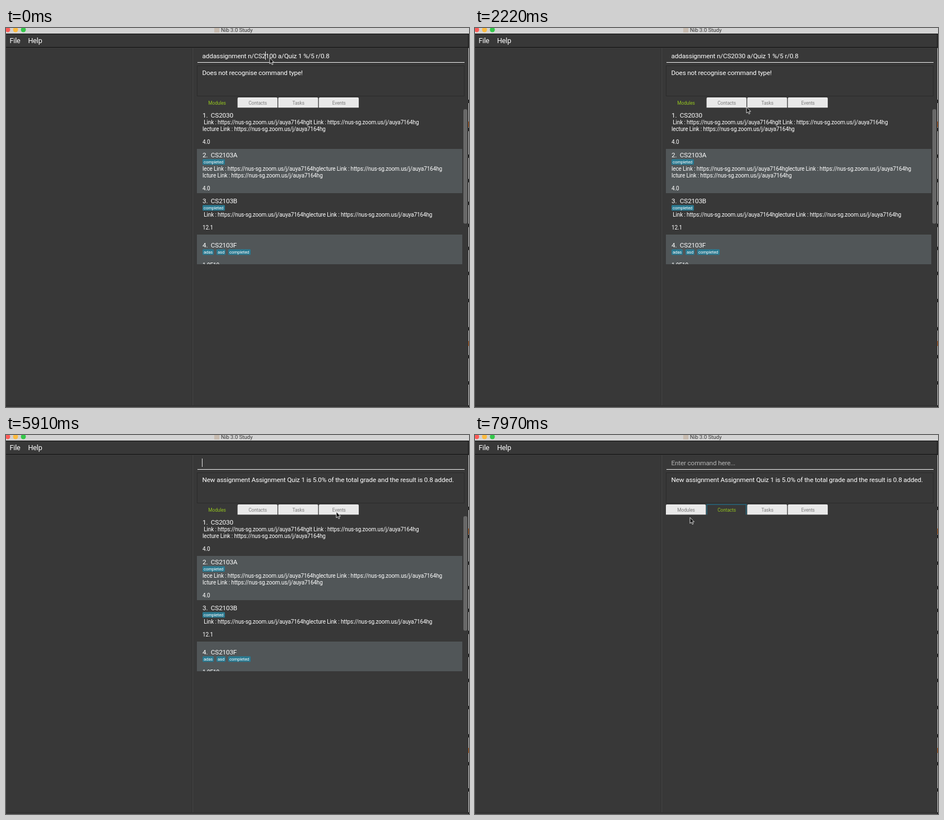
Recreate the animation shown at these times as an HTML page. Size 827 by 677 pixels, loop 8 s.

```html
<!DOCTYPE html>
<html lang="en">
<head>
<meta charset="utf-8">
<title>Course manager</title>
<style>
html, body { margin: 0; width: 100%; height: 100%; overflow: hidden; background: #383838; }
svg { display: block; }
text { font-family: Roboto, Inter, "Liberation Sans", sans-serif; letter-spacing: -.0145em; white-space: pre; fill: #fff; }
</style>
</head>
<body>
<svg id="stage" width="827" height="677" viewBox="0 0 827 677"></svg>
<script>
const rect = (x, y, w, h, fill, more = '') =>
  `<rect x="${x}" y="${y}" width="${w}" height="${h}" fill="${fill}" ${more}/>`;
const text = (x, y, size, str, more = '') =>
  `<text x="${x}" y="${y}" font-size="${size}" ${more}>${str}</text>`;
const repeat = (n, make) => Array.from({ length: n }, (_, i) => make(i)).join('');
const clamp = (v, lo, hi) => Math.min(hi, Math.max(lo, v));

const trafficLights = ['#fc5b57', '#fdbc40', '#34c84a'];
const frame = rect(0, 0, 827, 10, '#d3d3d3') +
  repeat(3, i => `<circle cx="${3 + i * 14}" cy="3" r="4.5" fill="${trafficLights[i]}"/>`) +
  rect(372, -1, 9, 9, '#c8bcb0') +
  text(384, 6.6, 9.9, 'Nib 3.0 Study', 'style="fill:#3c3c3c"') +
  rect(-.5, 10.5, 826.5, 24, '#383838', 'stroke="#101010"') +
  text(6.5, 27, 12.6, 'File') + text(39.5, 27, 12.6, 'Help') +
  rect(332, 36, 1, 638, '#2e2e2e') + rect(333, 36, 1, 638, '#484848') +
  rect(0, 674, 826, 1, '#2e2e2e') +
  rect(342, 61, 477, 1, '#f4f4f4') +
  rect(341.5, 67.5, 477, 54, 'none', 'stroke="#2b2b2b"');

// The strip of desktop beside the window
const desktop = rect(826, 36, 1, 641, '#c8c8c8') +
  repeat(13, i => rect(826, 128 + i * 45 + 8 * Math.sin(i * 7), 1, 6, '#0a0a0a')) +
  rect(826, 167, 1, 10, '#c8641e') + rect(826, 559, 1, 9, '#c8641e');

const link = 'Link : https://nus-sg.zoom.us/j/auya7164hg';
const cards = [
  { y: 160, name: 'CS2030', tags: [], lines: [` ${link}lt ${link}`, `lecture ${link}`], credits: '4.0' },
  { y: 231, name: 'CS2103A', tags: ['completed'], lines: [`lece ${link}lecture ${link}`, `lcture ${link}`], credits: '4.0' },
  { y: 313, name: 'CS2103B', tags: ['completed'], lines: [` ${link}lecture ${link}`], credits: '12.1' },
  { y: 392, name: 'CS2103F', tags: ['adas', 'asd', 'completed'], lines: [], credits: '1.0E10' }
];

function tagRow(tags, y) {
  let x = 351;
  return tags.map(str => {
    const w = 4 * str.length + 4;
    const svg = rect(x, y, w, 10, '#2a7990', 'rx="1.5"') + text(x + 2, y + 7.6, 7.7, str);
    x += w + 5;
    return svg;
  }).join('');
}

function card({ y, name, tags, lines, credits }, i) {
  const first = y + (tags.length ? 24 : 12);
  return text(351, y, 11.75, `${i + 1}.  ${name}`) + tagRow(tags, y + 3.3) +
    lines.map((str, k) => text(351, first + 12 * k, 10, str)).join('') +
    text(351, first + 12 * lines.length + 11, 10, credits);
}

const list = '<clipPath id="view"><rect x="341" y="143" width="486" height="279"/></clipPath>' +
  '<g id="list" clip-path="url(#view)">' +
  rect(341, 216, 474, 79, '#515658') + rect(341, 369, 474, 53, '#515658') +
  rect(817, 145, 7, 204.5, '#686868', 'rx="3"') + cards.map(card).join('') + '</g>';

const tabNames = ['Modules', 'Contacts', 'Tasks', 'Events'];
const tabs = tabNames.map((name, i) =>
  `<g class="tab" transform="translate(${341 + i * 72.6} 0)">` +
  '<path d="M0 142.3V126q0-2 2-2H69.3q2 0 2 2V142.3z" fill="#e9e9e9"/>' +
  '<path d="M.5 142.3V124.2H70.8V142.3" fill="none" stroke="#216f88" stroke-width="1.3"/>' +
  text(36, 136.5, 8.4, name, 'text-anchor="middle"') + '</g>').join('');

const $ = id => document.getElementById(id);
$('stage').innerHTML = frame + desktop + list + tabs +
  text(350.5, 53.8, 11.75, '', 'id="command"') +
  text(350.5, 83.6, 11.75, '', 'id="message"') +
  rect(0, 42, 1, 15, '#e4e4e4', 'id="caret"') +
  '<path id="mouse" d="M0 .3V11L2.5 8.7 4.2 12.6 6 11.8 4.3 8.1H7.5z" fill="#111" stroke="#eee" stroke-width=".9"/>';

const [command, message, caret, mouse, listNode] =
  ['command', 'message', 'caret', 'mouse', 'list'].map($);
const tabNodes = [...document.querySelectorAll('.tab')];

// The screen refreshes once per tick; events are given in ticks.
const TICK = 147, BLINK = 495;
const retype = 10, lastKey = 11, enter = 18, blur = 41, toTasks = 44, toContacts = 47;

// [start tick, end tick, x, y]; the pointer rests between moves
const home = [471, 53];
const moves = [
  [12, 15, 485, 141], [19, 22, 573, 230], [22, 23, 578, 454], [23, 24, 351, 421],
  [24, 27, 192, 300], [27, 29, 411, 313], [30, 32, 397, 183], [34, 37, 602, 190],
  [37, 40, 590, 137], [43, 45, 451, 131], [47, 49, 781, 626], [49, 52, 290, 3],
  [52, 54, 384, 147]
];

function pointer(tick) {
  return moves.reduce(([x, y], [start, end, toX, toY]) => {
    const p = clamp((tick - start) / (end - start), 0, 1);
    const e = p * p * (3 - 2 * p);
    return [x + (toX - x) * e, y + (toY - y) * e];
  }, home);
}

// Step the caret over "100", delete it, then type "030".
function courseDigits(tick) {
  const passed = clamp(tick, 0, 3);
  const deleted = clamp(tick - 4, 0, 3);
  const left = tick < retype ? '100'.slice(0, passed - deleted) : '030'.slice(0, tick - 8);
  return [left, '100'.slice(passed)];
}

function caretOn(tick) {
  const reset = tick < lastKey ? tick : tick < enter ? lastKey : enter;
  return tick < blur && Math.floor((tick - reset) * TICK / BLINK) % 2 === 0;
}

const show = (node, on) => { node.style.display = on ? '' : 'none'; };
const setText = (node, str) => { if (node.textContent !== str) node.textContent = str; };

function draw(tick) {
  const typing = tick < enter, focused = tick < blur;
  const [left, right] = courseDigits(tick);
  const before = 'addassignment n/CS2' + left;
  setText(command, typing ? `${before}${right} a/Quiz 1 %/5 r/0.8`
    : focused ? '' : 'Enter command here...');
  command.style.fill = focused ? '#fff' : '#b4b4b4';
  setText(message, typing ? 'Does not recognise command type!'
    : 'New assignment Assignment Quiz 1 is 5.0% of the total grade and the result is 0.8 added.');

  const offset = typing ? command.getSubStringLength(0, before.length) : 0;
  caret.setAttribute('x', Math.round(350 + offset));
  show(caret, caretOn(tick));

  const active = focused ? 0 : tick < toTasks ? 3 : tick < toContacts ? 2 : 1;
  show(listNode, active === 0);
  tabNodes.forEach((tab, i) => {
    const [face, outline, label] = tab.children;
    show(face, i !== active);
    show(outline, i === active && !focused);
    label.style.fill = i === active ? '#93c220' : '#7c7c7c';
  });

  mouse.setAttribute('transform', `translate(${pointer(tick).map(Math.round)})`);
}

function loop() {
  draw(Math.floor(performance.now() % 8000 / TICK));
  requestAnimationFrame(loop);
}
loop();
</script>
</body>
</html>
```
